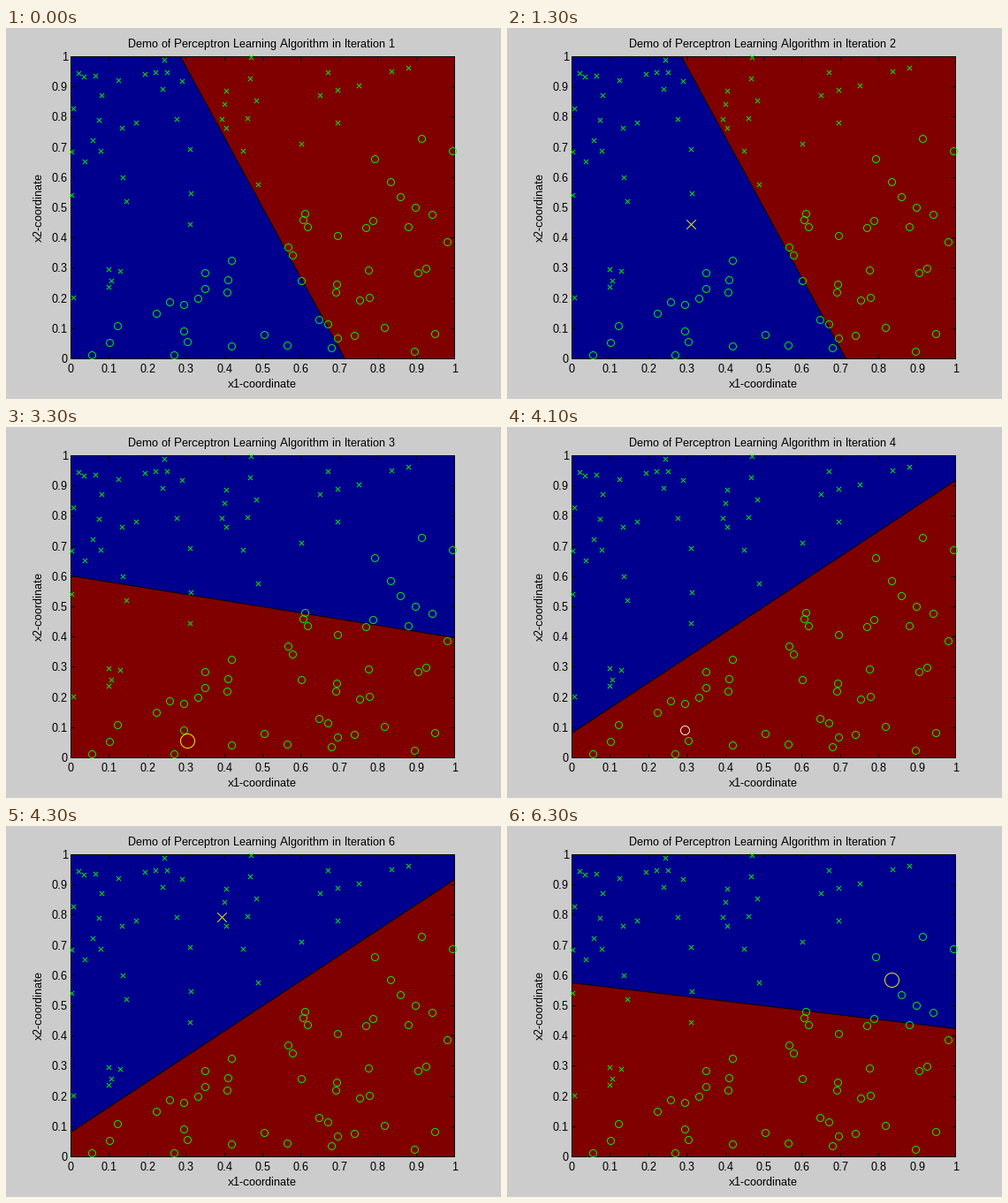
Recreate the animation shown at these times as a matplotlib script. Size 560 px wide and 420 px high, loop 8 s.

```python
import numpy as np
import matplotlib.pyplot as plt
from matplotlib.animation import FuncAnimation
from matplotlib.collections import LineCollection
from matplotlib.patches import Polygon, Rectangle

W, H, DPI = 560, 420, 100
PX = 72 / DPI
STEP_MS, FRAMES = 100, 80
L, R, T, B = 73, 507, 32, 374

plt.rcParams.update({
    "font.family": "Liberation Sans",
    "font.size": 13 * PX,
    "text.hinting": "native",
    "text.hinting_factor": 1,
    "path.snap": False,
})

BLUE, RED, LIME, YELLOW = "#00008f", "#800000", "#00ff00", "#ffff00"
OFFSET, MARGIN, COUNT = 0.083, 0.07, 47

# Start step, one end of the boundary (it runs through the centre),
# picked sample, and whether that sample triggers an update
iterations = [
    (0, (0.285, 1), None, False),
    (1, (0.285, 1), (0.311, 0.444), True),
    (21, (0, 0.602), (0.304, 0.056), True),
    (41, (0, OFFSET), (0.295, 0.091), False),
    (42, (0, OFFSET), (0.926, 0.298), False),
    (43, (0, OFFSET), (0.394, 0.792), True),
    (63, (0, 0.575), (0.834, 0.585), True),
]


def height(p):
    """Signed height above the line that separates the two classes."""
    return p[1] - OFFSET - (1 - 2 * OFFSET) * p[0]


def make_samples():
    cloud = [tuple(p) for p in np.random.default_rng(12).random((400, 2))]
    above = [p for p in cloud if height(p) > MARGIN][:COUNT]
    below = [p for p in cloud if height(p) < -MARGIN][:COUNT]
    return above + below + [it[2] for it in iterations if it[2]]


def to_px(p):
    return round(L + p[0] * (R - L)), round(B - p[1] * (B - T))


def cross(p, r):
    x, y = p
    return [[(x - r, y - r), (x + r, y + r)], [(x - r, y + r), (x + r, y - r)]]


def ring(p, r):
    a = np.linspace(0, 2 * np.pi, 49)
    return [np.column_stack([p[0] + r * np.cos(a), p[1] + r * np.sin(a)])]


def marker(p, size):
    """Cross above the separating line, circle below it."""
    if height(p) > 0:
        return cross(to_px(p), 0.33 * size)
    return ring(to_px(p), size / 2)


samples = make_samples()

fig = plt.figure(figsize=(W / DPI, H / DPI), dpi=DPI, facecolor="#cccccc")
ax = fig.add_axes([0, 0, 1, 1])
ax.set_xlim(-0.5, W - 0.5)
ax.set_ylim(H - 0.5, -0.5)
ax.axis("off")

ax.add_patch(Rectangle((L, T), R - L, B - T, fc=BLUE, ec="none", zorder=1))
half = ax.add_patch(Polygon([(L, B), (R, B), (R, T)], fc=RED, ec="none",
                            zorder=2))
boundary, = ax.plot([], [], color="black", lw=PX, zorder=3)
ax.add_patch(Rectangle((L, T), R - L, B - T, fill=False, ec="black", lw=PX,
                       zorder=4))

ticks = []
for k in range(11):
    x, y = to_px((k / 10, k / 10))
    ticks += [[(x, T), (x, T + 4.5)], [(x, B), (x, B - 4.5)],
              [(L, y), (L + 4.5, y)], [(R, y), (R - 4.5, y)]]
    label = f"{k / 10:g}"
    ax.text(x, 389.5, label, ha="center", va="baseline")
    ax.text(69.5, y + 4.5, label, ha="right", va="baseline")
ax.add_collection(LineCollection(ticks, colors="black", linewidths=PX,
                                 zorder=4), autolim=False)

title = ax.text(289, 21.5, "", ha="center", va="baseline")
ax.text(289, 406.5, "x1-coordinate", ha="center", va="baseline")
ax.text(40.5, 203, "x2-coordinate", ha="center", va="baseline",
        rotation=90, rotation_mode="anchor")

marks = LineCollection([], colors=LIME, linewidths=0.9 * PX, zorder=5)
chosen = LineCollection([], linewidths=0.9 * PX, zorder=6)
for group in (marks, chosen):
    ax.add_collection(group, autolim=False)


def draw(i):
    n = sum(i >= it[0] for it in iterations)
    _, end, pick, update = iterations[n - 1]

    p, q = to_px(end), to_px((1 - end[0], 1 - end[1]))
    corner = (R, T) if end[1] == 1 else (L, B)
    half.set_xy([p, corner, (R, B), q])
    boundary.set_data(*zip(p, q))

    marks.set_segments([s for m in samples if m != pick for s in marker(m, 8)])
    chosen.set_segments(marker(pick, 16 if update else 10) if pick else [])
    chosen.set_color(YELLOW if update else "white")
    title.set_text(f"Demo of Perceptron Learning Algorithm in Iteration {n}")
    return half, boundary, marks, chosen, title


anim = FuncAnimation(fig, draw, frames=FRAMES, interval=STEP_MS,
                     repeat=True, repeat_delay=0, blit=False)
plt.show()
```
